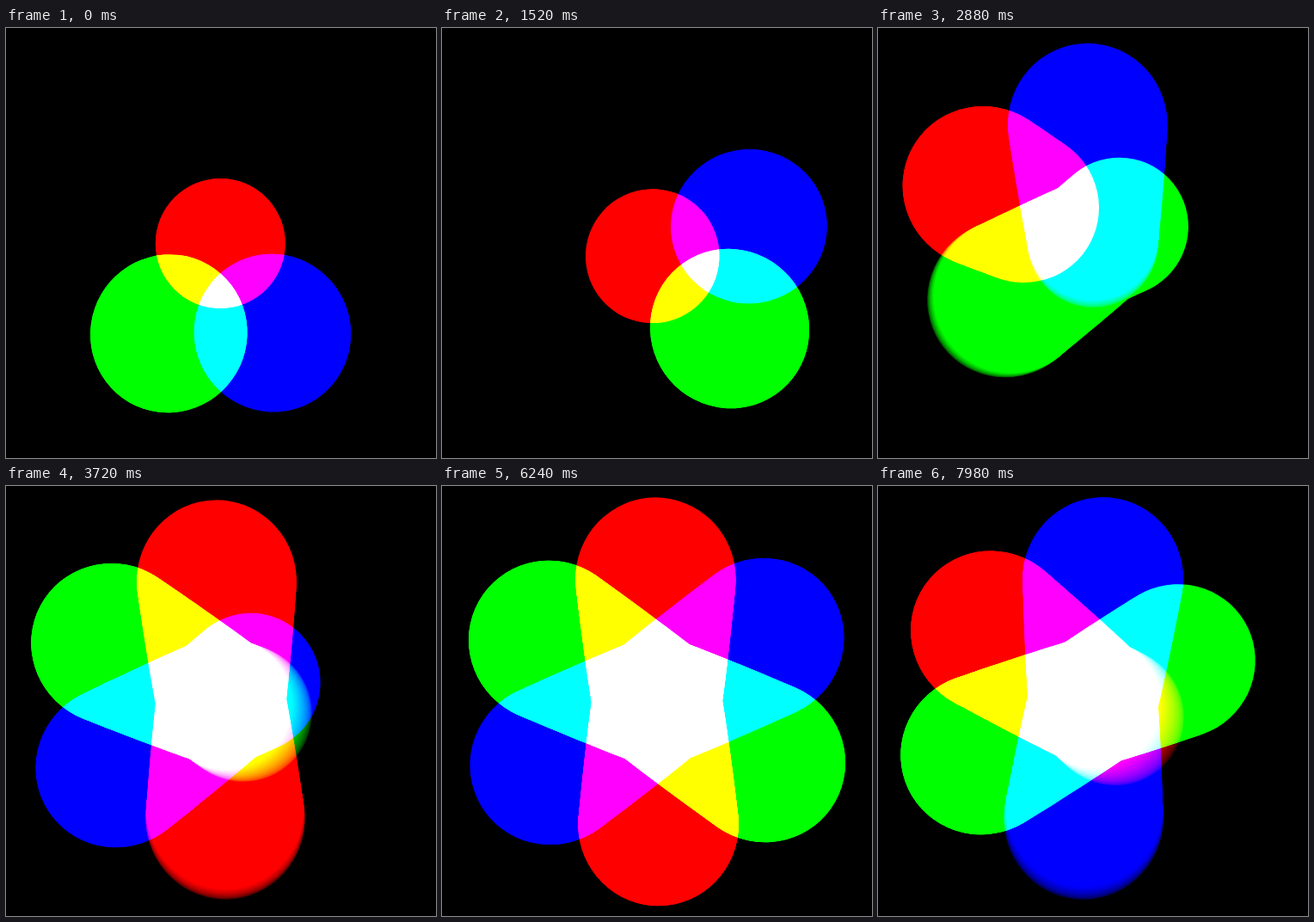
Recreate the animation shown at these times as an HTML page with a canvas. Size 500 by 500 pixels, loop 8 s.

```html
<!DOCTYPE html>
<html lang="en">
<head>
<meta charset="utf-8">
<title>Three discs with growing trails</title>
<style>
  html, body { margin: 0; width: 100%; height: 100%; overflow: hidden; background: #000; }
  canvas { display: block; width: 500px; height: 500px; }
</style>
</head>
<body>
<canvas id="stage" width="500" height="500"></canvas>
<script>
const ctx = document.getElementById('stage').getContext('2d');
const LOOP = 8;          // seconds
const CENTER_X = 250;
const CENTER_Y = 250.5;
const SPIN = 72;         // degrees per second, the three axes
const SWING = 360;       // degrees per second, discs along their axes
const BODY_STEP = 3;     // degrees between solid trail samples
const HEAD_GAP = 0.004;  // part of the trail skipped before its first sample
const FADE_SHARE = 0.07; // part of the trail that fades out
const FADE_STEPS = 24;
const rad = deg => deg * Math.PI / 180;

// Trail length in degrees of swing: zero, up to a full turn, down again.
function trailLength(t) {
  return Math.max(0, 366 - 91.5 * Math.abs(t - 6.04));
}

function drawDisc(channel, axis, phase, level) {
  const s = Math.sin(rad(phase));
  const size = Math.abs(s);
  const offset = s * (115 + 28 * size);
  const across = 75.3 + 18 * size;
  const rgb = [0, 0, 0];
  rgb[channel] = Math.round(255 * level);
  ctx.fillStyle = `rgb(${rgb})`;
  ctx.beginPath();
  ctx.ellipse(CENTER_X + offset * Math.cos(axis), CENTER_Y + offset * Math.sin(axis),
    across + 1.5 * size, across, axis, 0, 2 * Math.PI);
  ctx.fill();
}

function drawTrail(channel, t, length) {
  const axis = rad(SPIN * t + 120 * channel);
  const tip = 120 * channel - SWING * t;
  const head = tip + length * HEAD_GAP;
  const tail = tip + length;
  const fade = length * FADE_SHARE;
  if (fade > 0) {
    for (let i = 1; i < FADE_STEPS; i++) {
      const part = i / FADE_STEPS;
      drawDisc(channel, axis, tail - fade * part, Math.sqrt(part));
    }
  }
  const solid = tail - fade - head;
  const steps = Math.max(1, Math.ceil(solid / BODY_STEP));
  for (let i = 0; i <= steps; i++) {
    drawDisc(channel, axis, head + solid * i / steps, 1);
  }
}

function draw(t) {
  ctx.globalCompositeOperation = 'source-over';
  ctx.fillStyle = '#000';
  ctx.fillRect(0, 0, 500, 500);
  // Per-channel maximum: colours add up, trails do not brighten themselves.
  ctx.globalCompositeOperation = 'lighten';
  const length = trailLength(t);
  for (let channel = 0; channel < 3; channel++) drawTrail(channel, t, length);
}

const start = performance.now();
function tick() {
  draw((performance.now() - start) / 1000 % LOOP);
  requestAnimationFrame(tick);
}
tick();
</script>
</body>
</html>
```
